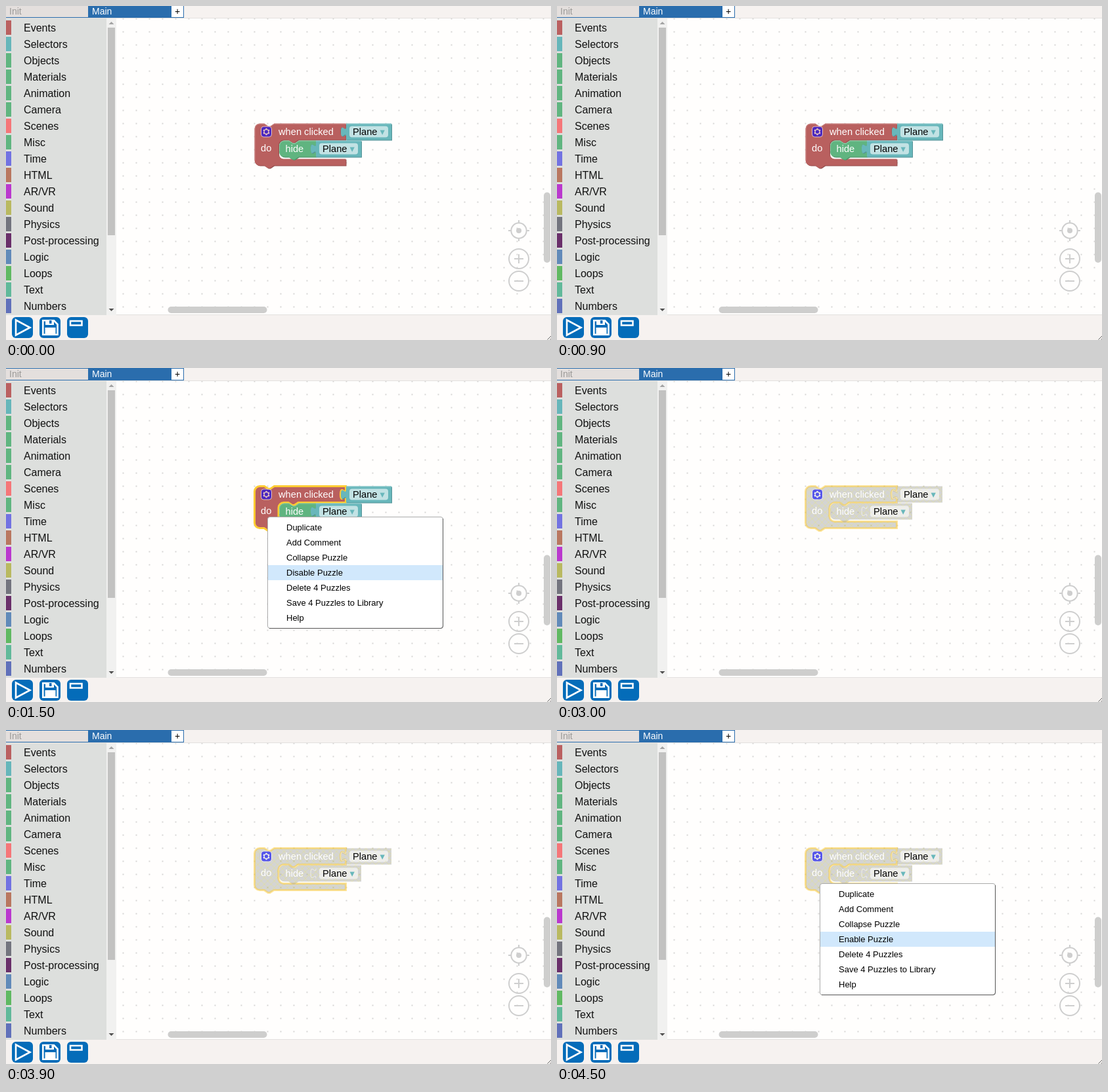
These frames come from a looping animation (830x510 px, 6000 ms). An HTML page:

```html
<!DOCTYPE html>
<html lang="en">
<head>
<meta charset="utf-8">
<title>Puzzle editor</title>
<style>
  html, body { margin: 0; width: 100%; height: 100%; overflow: hidden; background: #fffefd; }
  svg { display: block; width: 830px; height: 510px; font-family: "Liberation Sans", Arial, sans-serif; }
  text { white-space: pre; }
  .block text { font-size: 14.667px; fill: #fff; }
  .block .field { fill: #000; }
  .selected > .body { stroke: #fc3; stroke-width: 3; }
  .selected > .light { display: none; }
  .disabled .body { fill: url(#hatch); fill-opacity: .5; stroke-opacity: .5; }
  .disabled .light, .disabled .dark { display: none; }
  .seam { fill: none; stroke: #fff; stroke-opacity: 0; }
  .disabled .seam { stroke-opacity: .55; }
</style>
</head>
<body>
<svg id="stage" viewBox="0 0 830 510">
  <defs>
    <pattern id="hatch" width="10" height="10" patternUnits="userSpaceOnUse">
      <rect width="10" height="10" fill="#aaa"/>
      <path d="M0 0L10 10M10 0L0 10" stroke="#cc0" stroke-opacity=".5"/>
    </pattern>
    <pattern id="grid" x="168.5" y="10.5" width="20" height="20" patternUnits="userSpaceOnUse">
      <rect x="9" y="9" width="2" height="2" fill="#d6d6d5"/>
    </pattern>
  </defs>
  <g id="page">
    <rect width="830" height="512" fill="#fffefd"/>
    <rect x="168" y="20" width="662" height="453" fill="url(#grid)"/>
    <g id="blocks"></g>
    <g fill="#cececd">
      <rect x="246.500" y="460" width="151" height="10" rx="5"/>
      <rect x="819" y="285.500" width="10" height="107.500" rx="5"/>
    </g>
    <g fill="none" stroke="#cecece" stroke-width="2">
      <circle cx="781" cy="344" r="11.700"/>
      <circle cx="781" cy="344" r="4" fill="#cecece" stroke="none"/>
      <path d="M765 344h4M793 344h4M781 328v4M781 356v4"/>
      <circle cx="781" cy="387" r="15"/>
      <circle cx="781" cy="421" r="15"/>
      <path d="M774 387h14M781 380v14M774 421h14"/>
    </g>
    <g id="sidebar"></g>
    <g id="header" font-size="14">
      <rect width="830" height="19" fill="#f6f2f0"/>
      <rect y="19" width="830" height="1" fill="#e3e1df"/>
      <rect width="126" height="19" fill="#e4dfdd"/>
      <path d="M0 .5H126M0 18.500H126" stroke="#2a6dad"/>
      <rect x="125" width="127" height="19" fill="#2a6dad"/>
      <rect x="251.500" y=".5" width="19" height="18" fill="#fff" stroke="#2a6dad"/>
      <text x="5" y="14" fill="#9b9997">Init</text>
      <text x="131" y="14" fill="#fff">Main</text>
      <text x="261" y="14" text-anchor="middle">+</text>
    </g>
    <g id="toolbar">
      <rect y="473" width="830" height="40" fill="#f6f2f0"/>
      <rect x="168" y="472" width="662" height="1" fill="#e3e1df"/>
      <g fill="#046cb9">
        <rect x="9" y="476" width="32" height="32" rx="6"/>
        <rect x="51" y="476" width="32" height="32" rx="6"/>
        <rect x="93" y="476" width="32" height="32" rx="6"/>
      </g>
      <g fill="none" stroke="#fff" stroke-width="2.600">
        <path d="M15 480.500V503.500L36.500 492Z"/>
        <path d="M56.300 481.300H73L78.500 487V502.700H56.300Z"/>
        <path d="M98 482H115.500V488.500H98Z" stroke-width="2.500"/>
      </g>
      <path d="M60 481H73V488H60ZM59.500 492H75.500V503H59.500Z" fill="#fff"/>
      <rect x="66" y="481" width="3.500" height="5" fill="#046cb9"/>
    </g>
    <g id="menu"></g>
  </g>
  <path d="M824.500 509.500L830 504M828.500 509.500L830 508" stroke="#666" fill="none"/>
</svg>
<script>
const $ = id => document.getElementById(id);
const RED = "#b9605f", TEAL = "#68b7bb", GREEN = "#60b480";

// Toolbox
const categories = [
  ["Events", "#ba6060"], ["Selectors", "#66b6ba"], ["Objects", "#60b580"],
  ["Materials", "#60b580"], ["Animation", "#60b580"], ["Camera", "#60b580"],
  ["Scenes", "#f57679"], ["Misc", "#60b580"], ["Time", "#7272e2"],
  ["HTML", "#b97760"], ["AR/VR", "#ba38ce"], ["Sound", "#b9b960"],
  ["Physics", "#73747e"], ["Post-processing", "#6a2f6a"], ["Logic", "#618ab9"],
  ["Loops", "#60b962"], ["Text", "#61b99a"], ["Numbers", "#6070ba"]
];
$("sidebar").innerHTML =
  `<rect y="20" width="153" height="453" fill="#dddfdd"/>
   <rect x="153" y="20" width="15" height="453" fill="#f1f1f0"/>
   <rect x="155" y="34" width="11" height="317" fill="#c2c2c1"/>
   <path d="M156.500 29L160.500 25L164.500 29Z" fill="#a3a3a3"/>
   <path d="M156.500 463L160.500 467L164.500 463Z" fill="#505050"/>` +
  categories.map(([name, color], i) =>
    `<rect y="${23 + 25 * i}" width="8" height="22" fill="${color}"/>
     <text x="27" y="${40 + 25 * i}" font-size="16" fill="#111">${name}</text>`).join("");

// Block outlines
const notchIn = "H15l6,4 3,0 6,-4";
const notchOut = "H29.5l-6,4 -3,0 -6,-4";
const socket = "v5c0,10 -8,-8 -8,7.500s8,-2.500 8,7.500v5";
const tab = "V20c0,-10 -8,8 -8,-7.500s8,2.500 8,-7.500";
const corner = "M0,8A8,8 0 0 1 8,0";
const foot = notchOut + "H8a8,8 0 0 1 -8,-8Z";
const topLight = (w, h) => `M.5,${h - 8}V8A7.500,7.500 0 0 1 8,.5${notchIn}H${w}`;

const eventPath = corner + notchIn + "H139" + socket +
  "H66.500l-6,4 -3,0 -6,-4h-7a8,8 0 0 0 -8,8v13a8,8 0 0 0 8,8H139v10" + foot;
const hidePath = corner + notchIn + "H56" + socket + foot;
const valuePath = "M0,0H69V25H0" + tab + "Z";

const shade = (hex, to, k) => "rgb(" + [1, 3, 5].map(i =>
  Math.round(parseInt(hex.slice(i, i + 2), 16) * (1 - k) + to * k)) + ")";

const block = (x, y, path, light, color, inner, cls = "") =>
  `<g class="block ${cls}" transform="translate(${x},${y})">
     <path class="dark" d="${path}" transform="translate(1,1)" fill="${shade(color, 0, .2)}"/>
     <path class="body" d="${path}" fill="${color}"/>
     <path class="light" d="${light}" fill="none" stroke="${shade(color, 255, .3)}"/>
     ${inner}</g>`;

const value = (x, y) => block(x, y, valuePath, "M0,.5H69", TEAL,
  `<path class="seam" d="M0,20${tab}"/>
   <rect x="5" y="4" width="59" height="17" rx="4" fill="#fff" fill-opacity=".6"/>
   <text class="field" x="10" y="17.500">Plane<tspan fill="${TEAL}">\u00a0▾</tspan></text>`);

const teeth = [0, 1, 2, 3, 4, 5].map(i =>
  `<rect x="-1.200" y="-5.200" width="2.400" height="3" rx=".4" transform="rotate(${60 * i})"/>`).join("");
const gear =
  `<g opacity=".6" transform="translate(18,12.500)">
     <rect x="-8" y="-8" width="16" height="16" rx="4" fill="#00f" stroke="#fff"/>
     <g fill="#fff">${teeth}<circle r="4"/></g><circle r="2.700" fill="#00f"/></g>`;

const hide = block(37.5, 26, hidePath, topLight(56, 25), GREEN,
  `<text x="9.500" y="17.500">hide</text>` + value(56, 0));

const drawBlocks = cls => block(378.5, 180.5, eventPath, topLight(139, 64), RED,
  gear + `<text x="36.500" y="17.500">when clicked</text><text x="9.500" y="42.500">do</text>` +
  value(139.5, 0) + hide, cls);

// Context menu
const drawMenu = (x, y, toggle) => {
  const items = ["Duplicate", "Add Comment", "Collapse Puzzle", toggle + " Puzzle",
    "Delete 4 Puzzles", "Save 4 Puzzles to Library", "Help"];
  return `<g transform="translate(${x},${y})" font-size="13">
    <rect x=".5" y=".5" width="267" height="170" rx="3.500" fill="#fff" stroke="#aaa"/>
    <path d="M267.500,3V167a3.500,3.500 0 0 1 -3.500,3.500H3" fill="none" stroke="#555"/>
    <rect x="1" y="74" width="266" height="23" fill="#d1e8fc"/>` +
    items.map((s, i) => `<text x="29" y="${21 + 23 * i}">${s}</text>`).join("") + "</g>";
};

const steps = [
  { shift: -1, cls: "", menu: "" },
  { shift: 0, cls: "selected", menu: drawMenu(398, 227, "Disable") },
  { shift: 0, cls: "selected disabled", menu: "" },
  { shift: 0, cls: "selected disabled", menu: drawMenu(400, 234, "Enable") }
];
let current = -1;

function render(ms) {
  const i = Math.floor(ms % 6000 / 1500);
  if (i === current) return;
  current = i;
  const { shift, cls, menu } = steps[i];
  $("page").setAttribute("transform", `translate(0,${shift})`);
  $("blocks").innerHTML = drawBlocks(cls);
  $("menu").innerHTML = menu;
}

const start = performance.now();
function tick() {
  render(performance.now() - start);
  requestAnimationFrame(tick);
}
tick();
</script>
</body>
</html>
```
